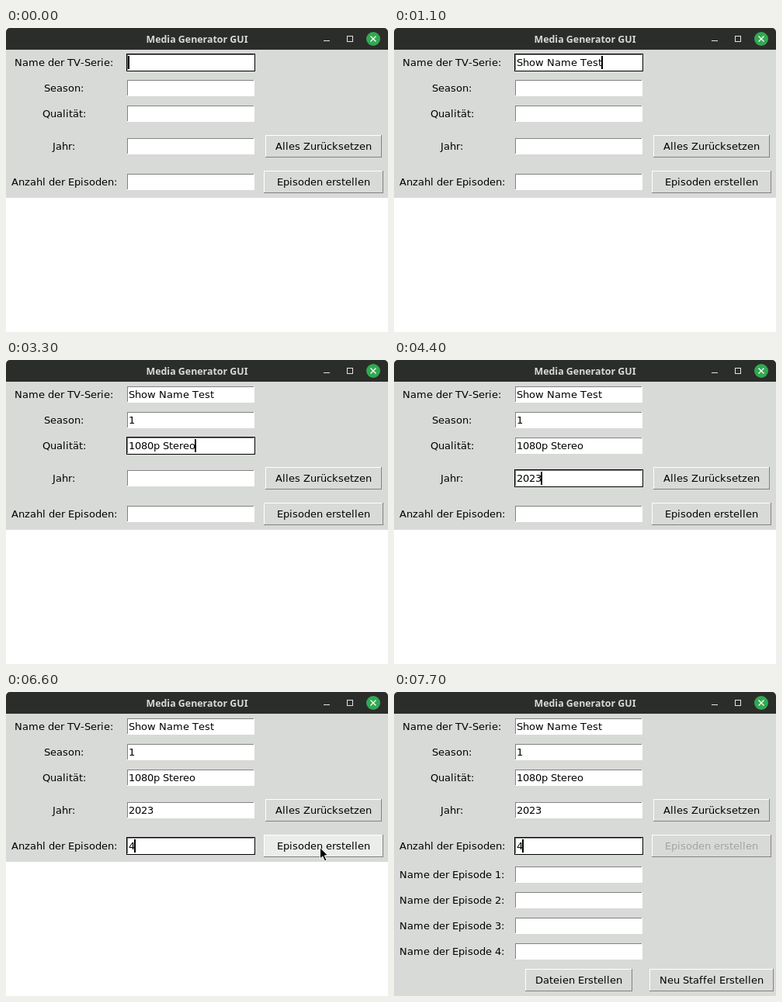
Write an HTML page with a canvas that moves like this. It is 492 by 392 pixels and loops after 8000 ms.

```html
<!DOCTYPE html>
<html lang="de">
<head>
<meta charset="utf-8">
<title>Media Generator GUI</title>
<style>
  html, body { margin: 0; width: 100%; height: 100%; overflow: hidden; background: #fff; }
  canvas { display: block; }
</style>
</head>
<body>
<canvas id="stage" width="492" height="392"></canvas>
<script>
const ctx = document.getElementById('stage').getContext('2d');
const LOOP = 8000, STEP = 1100;
const UI_FONT = '13px "DejaVu Sans", sans-serif';
const TITLE_FONT = '600 12.4px "Noto Sans", sans-serif';
const FACE = '#d8dad7', HOVER = '#ebedea', SHADOW = '#828282', DISABLED = '#a3a3a3';
const LABEL_CENTER = 75;

const fields = [
  { label: 'Name der TV-Serie:', value: 'Show Name Test', y: 33 },
  { label: 'Season:', value: '1', y: 66 },
  { label: 'Qualität:', value: '1080p Stereo', y: 99 },
  { label: 'Jahr:', value: '2023', y: 141 },
  { label: 'Anzahl der Episoden:', value: '4', y: 187 }
];

function rect(x, y, w, h, color) {
  ctx.fillStyle = color;
  ctx.fillRect(x, y, w, h);
}

function shape(points, fill, stroke, width = 1) {
  ctx.beginPath();
  points.forEach(([x, y]) => ctx.lineTo(x, y));
  ctx.closePath();
  if (fill) { ctx.fillStyle = fill; ctx.fill(); }
  if (stroke) { ctx.strokeStyle = stroke; ctx.lineWidth = width; ctx.stroke(); }
}

// The toolkit advances each glyph by whole pixels.
const advance = ch => Math.round(ctx.measureText(ch).width);
const textWidth = text => [...text].reduce((sum, ch) => sum + advance(ch), 0);

function drawText(text, x, baseline, color = '#000') {
  ctx.fillStyle = color;
  for (const ch of text) {
    ctx.fillText(ch, x, baseline);
    x += advance(ch);
  }
  return x;
}

function bevel(x, y, w, h, topLeft, bottomRight, face) {
  rect(x, y, w, h, bottomRight);
  rect(x, y, w - 1, h - 1, topLeft);
  rect(x + 1, y + 1, w - 2, h - 2, face);
}

function entry(y, value, focused) {
  if (focused) rect(155, y, 166, 23, '#000');
  bevel(156, y + 1, 164, 21, SHADOW, '#fff', '#fff');
  const end = drawText(value, 158, y + 16);
  if (focused) rect(end - 1, y + 3, 2, 17, '#000');
}

function row(label, y, value = '', focused = false) {
  drawText(label, Math.floor(LABEL_CENTER - textWidth(label) / 2), y + 16);
  entry(y, value, focused);
}

function button(text, center, y, pad = 13, face = FACE, color = '#000') {
  const w = textWidth(text), x = Math.floor(center - w / 2);
  bevel(x - pad, y, w + 2 * pad, 29, '#fff', SHADOW, face);
  drawText(text, x, y + 19, color);
}

function titleBar() {
  ctx.beginPath();
  ctx.roundRect(0, 0, 492, 28, [5, 5, 0, 0]);
  ctx.fillStyle = '#2b2d2a';
  ctx.fill();

  ctx.font = TITLE_FONT;
  ctx.textAlign = 'center';
  ctx.fillStyle = '#d8dad7';
  ctx.fillText('Media Generator GUI', 246, 19);
  ctx.textAlign = 'left';

  rect(409, 16, 8, 1, '#e4e4e4');
  ctx.strokeStyle = '#e4e4e4';
  ctx.lineWidth = 1;
  ctx.strokeRect(439.5, 10.5, 7, 7);

  ctx.beginPath();
  ctx.arc(473, 14, 9, 0, 2 * Math.PI);
  ctx.fillStyle = '#32a852';
  ctx.fill();
  ctx.beginPath();
  for (const s of [-1, 1]) {
    ctx.moveTo(469.5, 14 - 3.5 * s);
    ctx.lineTo(476.5, 14 + 3.5 * s);
  }
  ctx.strokeStyle = '#fff';
  ctx.lineWidth = 1.3;
  ctx.stroke();
}

function pointer(x, y) {
  shape([[0, 0], [0, 14.5], [3.3, 11.4], [6, 17.5], [8.5, 16.4], [5.9, 10.4], [10, 10.2]]
    .map(([dx, dy]) => [x + dx, y + dy]), '#000', '#fff');
}

function draw(step) {
  const hover = step === 6, expanded = step === 7;
  const focus = Math.min(Math.max(step - 1, 0), 4);

  rect(0, 0, 492, 392, '#fff');
  titleBar();
  rect(0, 28, 492, expanded ? 364 : 191, FACE);

  ctx.font = UI_FONT;
  fields.forEach(({ label, value, y }, i) =>
    row(label, y, step > i ? value : '', focus === i));
  button('Alles Zurücksetzen', 409, 138);
  button('Episoden erstellen', 409, 184, 17,
    hover ? HOVER : FACE, expanded ? DISABLED : '#000');

  if (expanded) {
    for (let i = 0; i < 4; i++) row(`Name der Episode ${i + 1}:`, 224 + 33 * i);
    button('Dateien Erstellen', 238, 357);
    button('Neu Staffel Erstellen', 409, 357);
  }
  if (hover) pointer(404.5, 200.5);
}

function tick() {
  draw(Math.floor(performance.now() % LOOP / STEP));
  requestAnimationFrame(tick);
}
tick();
</script>
</body>
</html>
```
